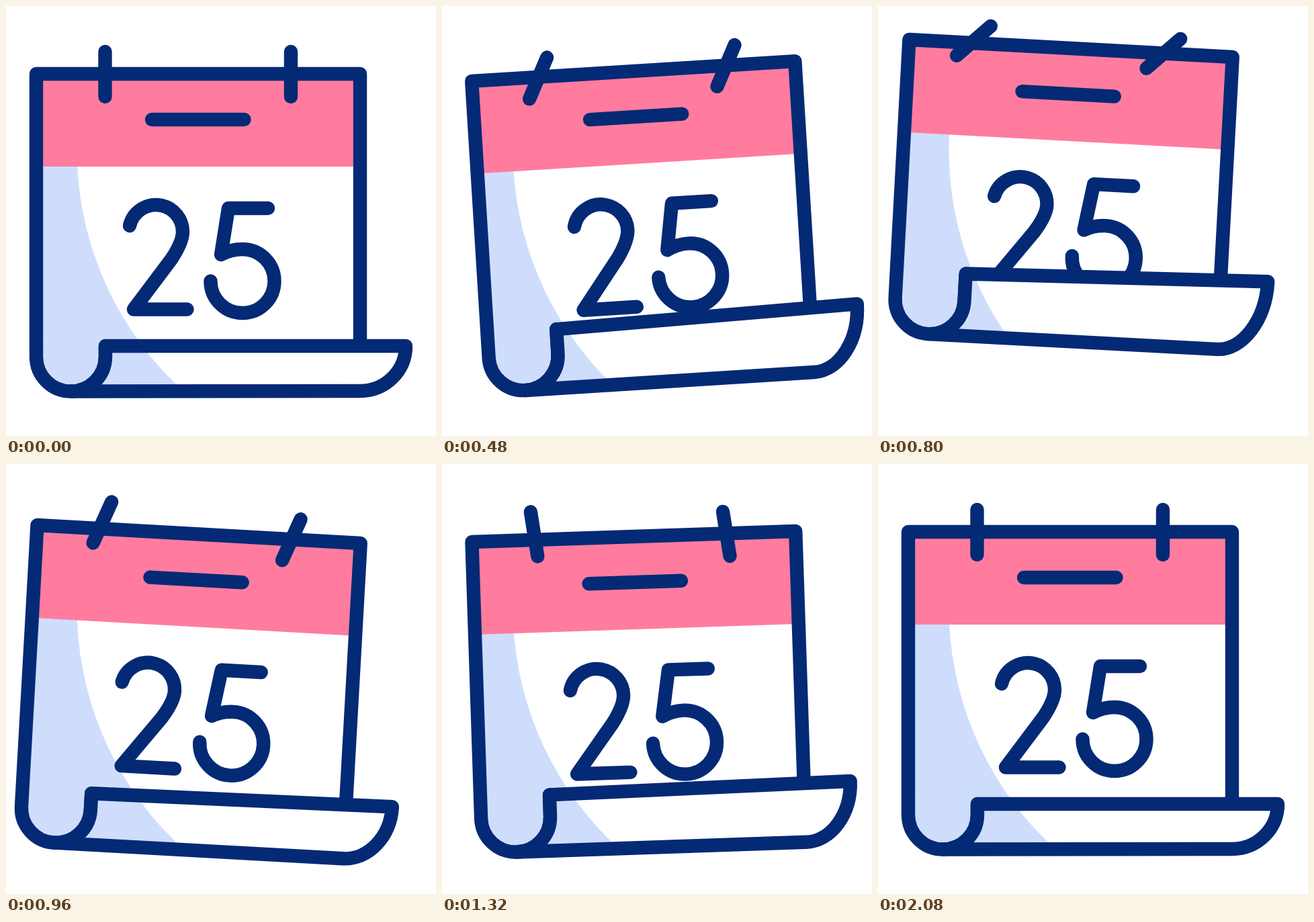
An HTML page with a canvas for the animation above (3 s loop, 640 by 640 pixels).

```html
<!DOCTYPE html>
<html lang="en">
<head>
<meta charset="utf-8">
<title>Calendar jump</title>
<style>
html, body { margin: 0; width: 100%; height: 100%; overflow: hidden; background: #fff; }
canvas { display: block; }
</style>
</head>
<body>
<canvas id="stage" width="640" height="640"></canvas>
<script>
const ctx = document.getElementById('stage').getContext('2d');
const NAVY = '#042a75', PINK = '#ff7c9f', BLUE = '#cfddfc';
const LOOP = 3000, STEP = 40, END = 2080;

// Channels are [time, value] pairs; plain lists use the shared beats.
const BEATS = [0, 320, 640, 960, 1320, 1640, END];
const onBeats = (...values) => values.map((v, i) => [BEATS[i], v]);

const tracks = {
  angle: [[0, 0], [320, -2.85], [430, -3.75], [560, -2.7], [640, -1.17], [860, 3.75],
          [960, 3.21], [1100, 0], [1240, -2.05], [1320, -1.9], [1640, -.83], [END, 0]],
  lift: [[0, 0], [320, 20], [640, -37], [740, -45], [960, 3.5], [1090, 20],
         [1320, 7], [1640, 0], [END, 0]],
  stretch: [[0, 0], [320, 24], [640, -44], [720, -46], [960, -2], [1090, 8],
            [1320, -9], [1640, -19], [END, 0]],
  curl: onBeats(0, 0, -41, -9, -16, -24, 0),
  skew: onBeats(0, 0, -20, -5, -5.5, -6.5, 0),
  tilt: onBeats(0, -19.8, 65.5, 24.3, -9, -43.2, 0),
  ringX: onBeats(0, 0, -7, -6, -9.5, 1, 0),
  ringY: onBeats(0, 0, 2.5, -10, -9, -3.5, 0)
};

// Smooth interpolation that never overshoots its keys.
function sample(keys, t) {
  let i = 0;
  while (i < keys.length - 2 && t > keys[i + 1][0]) i++;
  const rate = k => (keys[k + 1][1] - keys[k][1]) / (keys[k + 1][0] - keys[k][0]);
  const slope = k => {
    if (k === 0 || k === keys.length - 1) return 0;
    const a = rate(k - 1), b = rate(k);
    return a * b > 0 ? 2 * a * b / (a + b) : 0;
  };
  const [t0, v0] = keys[i], [t1, v1] = keys[i + 1];
  const span = t1 - t0, u = (t - t0) / span, w = 1 - u;
  return v0 * w * w * (1 + 2 * u) + v1 * u * u * (3 - 2 * u)
    + span * u * w * (slope(i) * w - slope(i + 1) * u);
}

const rad = deg => deg * Math.PI / 180;

const digits = new Path2D();
digits.arc(223, 336, 40, Math.PI + .227, 2 * Math.PI);
digits.bezierCurveTo(263, 350, 254, 365, 246, 377);
digits.lineTo(190, 451.5);
digits.lineTo(269.5, 451.5);
digits.moveTo(390, 301);
digits.lineTo(331, 301);
digits.lineTo(320, 370);
digits.quadraticCurveTo(335, 362, 352, 362);
digits.arc(352, 409.5, 47.5, -Math.PI / 2, Math.PI);

function line(x1, y1, x2, y2) {
  ctx.beginPath();
  ctx.moveTo(x1, y1);
  ctx.lineTo(x2, y2);
  ctx.stroke();
}

// Paper with a shadow whose round edge stays fixed on the stage.
function paper(path) {
  ctx.save();
  ctx.clip(path);
  ctx.resetTransform();
  ctx.fillStyle = BLUE;
  ctx.fillRect(0, 0, 640, 640);
  ctx.fillStyle = '#fff';
  ctx.beginPath();
  ctx.arc(592, 214, 486.5, 0, 2 * Math.PI);
  ctx.fill();
  ctx.restore();
}

function draw(t) {
  const p = {};
  for (const name in tracks) p[name] = sample(tracks[name], t);
  const hub = 522 + p.stretch, bottom = hub + 51;
  const left = 506 + p.stretch + p.curl, right = left + p.skew;

  const sheet = new Path2D();
  sheet.moveTo(148, left);
  sheet.lineTo(148, hub);
  sheet.arc(96.5, hub, 51.5, 0, Math.PI);
  sheet.lineTo(45, 101);
  sheet.lineTo(527, 101);
  sheet.lineTo(527, left + p.skew * .85);

  const edge = 595 - p.skew * .2;
  const roll = new Path2D();
  roll.moveTo(148, left);
  roll.lineTo(148, hub);
  roll.arc(96.5, hub, 51.5, 0, Math.PI / 2);
  roll.lineTo(527, bottom);
  roll.bezierCurveTo(565, bottom, edge, bottom - (bottom - right) * .45, edge, right);
  roll.closePath();

  ctx.resetTransform();
  ctx.fillStyle = '#fff';
  ctx.fillRect(0, 0, 640, 640);
  ctx.strokeStyle = NAVY;
  ctx.lineWidth = 20.4;
  ctx.lineCap = ctx.lineJoin = 'round';

  ctx.translate(286, 121 + p.lift);
  ctx.rotate(rad(p.angle));
  ctx.translate(-286, -121);

  paper(sheet);
  ctx.fillStyle = PINK;
  ctx.fillRect(45, 101, 482, 138);
  ctx.stroke(digits);
  line(217, 169, 354.5, 169);
  ctx.stroke(sheet);
  paper(roll);
  ctx.stroke(roll);

  for (const [x, y] of [[147.5 + p.ringX, 101.5 + p.ringY], [424, 101.5]]) {
    ctx.save();
    ctx.translate(x, y);
    ctx.rotate(rad(p.tilt - p.angle));
    line(0, -33.5, 0, 33.5);
    ctx.restore();
  }
}

const start = performance.now();
function tick() {
  const t = (performance.now() - start) % LOOP;
  draw(Math.min(END, Math.floor(t / STEP) * STEP));
  requestAnimationFrame(tick);
}
tick();
</script>
</body>
</html>
```
